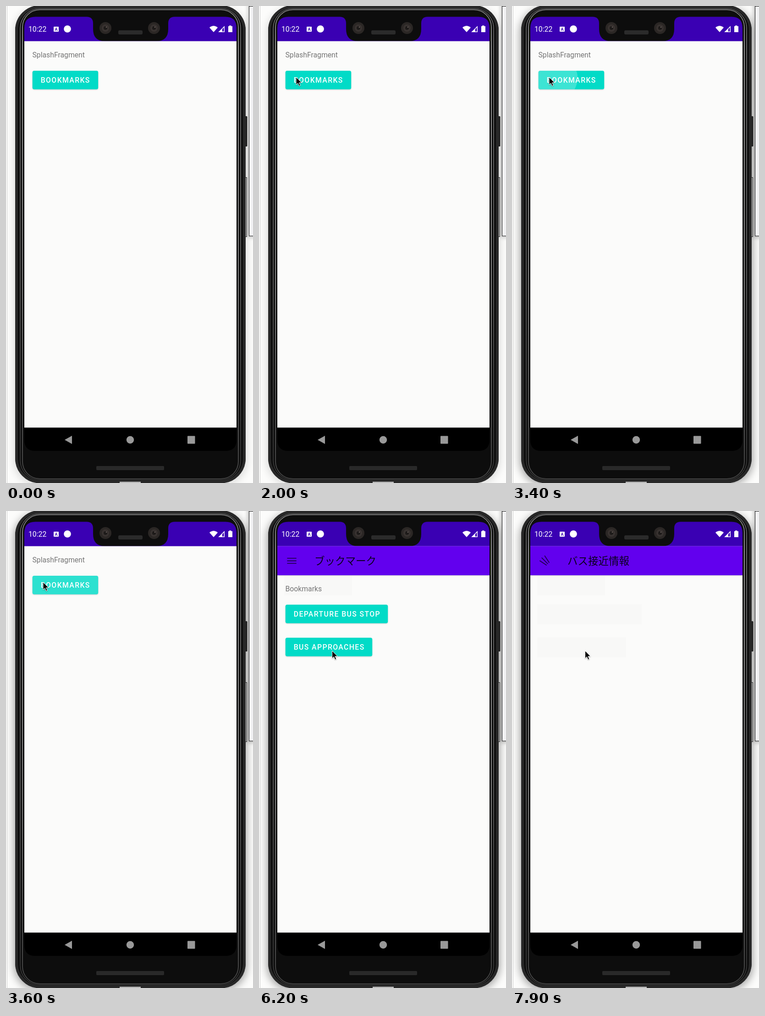
These frames come from a looping animation (539x1039 px, 8 s). An HTML page:

```html
<!DOCTYPE html>
<html lang="ja">
<head>
<meta charset="utf-8">
<title>Bookmarks</title>
<style>
html, body { margin: 0; width: 100%; height: 100%; overflow: hidden; background: #fcfcfb; }
svg { display: block; width: 100%; height: 100%; }
text { font: 15.77px Roboto, sans-serif; }
.label { fill: #757575; }
.btn { fill: #fff; font-weight: 500; letter-spacing: .0893em; }
.title { font: 22.5px "Noto Sans CJK JP", "Noto Sans CJK", sans-serif; fill: #0b0020; }
#shadow { filter: blur(9px); }
#side { filter: blur(5px); }
.plate { filter: drop-shadow(0 1px 1px rgba(0,0,0,.18)); }
</style>
</head>
<body>
<svg id="stage" viewBox="0 0 539 1039"></svg>
<script>
const K = 1.126; // pixels per dp
const TEAL = '#02dbc7';

const button = (id, y, w, label) => `
  <clipPath id="${id}Clip"><rect x="57.700" y="${y}" width="${w}" height="40.500" rx="4"/></clipPath>
  <rect class="plate" x="57.700" y="${y}" width="${w}" height="40.500" rx="4" fill="${TEAL}"/>
  <g clip-path="url(#${id}Clip)"><circle id="${id}Ripple" fill="#fff" opacity="0"/></g>
  <text class="btn" x="75.700" y="${y + 26}">${label}</text>`;

const ring = (inset, r, color, width) =>
  `<rect x="${20 + inset}" y="${inset * .5}" width="${503 - 2 * inset}" height="${1038 - inset}" rx="${r}"
    fill="none" stroke="${color}" stroke-width="${width}"/>`;

const lens = x => `
  <circle cx="${x}" cy="48" r="13" fill="#2b2725"/>
  <circle cx="${x}" cy="48" r="8" fill="#383230"/>
  <circle cx="${x}" cy="48" r="4" fill="#1d1a19"/>
  <circle cx="${x + 2}" cy="46" r="1.300" fill="#6b625d"/>`;

const ghost = (y, w, h) => `<rect x="55" y="${y}" width="${w}" height="${h}" fill="#f8f8f7"/>`;

document.getElementById('stage').innerHTML = `
<defs>
  <linearGradient id="shine" x2="0" y2="1">
    <stop offset="0" stop-color="#777"/><stop offset=".08" stop-color="#a2a2a2"/>
    <stop offset=".6" stop-color="#8c8c8c"/><stop offset="1" stop-color="#444"/>
  </linearGradient>
  <clipPath id="body"><rect x="40" y="76.600" width="463" height="842"/></clipPath>
</defs>
<rect width="539" height="1039" fill="#fcfcfb"/>
<rect id="shadow" x="17" y="4" width="509" height="1040" rx="54"/>
<rect id="side" x="528" y="-10" width="30" height="514"/>
<path d="M2.5 0V1039" stroke="#cfcfcf"/>
<rect x="530.5" y=".5" width="20" height="500.500" fill="#f1f1f3" stroke="#111"/>

<rect x="520" y="240" width="6.500" height="66" rx="1.500" fill="#222"/>
<rect x="520" y="373.500" width="5.500" height="129" fill="#b4b4b4" stroke="#222"/>
<rect x="20" y="0" width="503" height="1038" rx="54" fill="#0d0d0d"/>
${ring(3, 51, '#282828', 6)}
${ring(11, 43, 'url(#shine)', 1.2)}
${ring(16, 38, 'url(#shine)', 1.8)}
<path d="M248 1037.5H294" stroke="#eee" stroke-width="2"/>
<rect x="197" y="1002" width="148" height="9" rx="2" fill="#292929"/>

<path d="M40 77V48Q40 23.500 64 23.500H176Q190 23.500 190 38V50Q190 76.600 216 76.600H328Q354 76.600 354 50V38Q354 23.500 368 23.500H479Q503 23.500 503 48V77Z" fill="#3a00b3"/>
<rect x="40" y="76.600" width="463" height="842" fill="#fbfbfa"/>
<rect x="245" y="53" width="53" height="9" rx="3" fill="#2b2b2b"/>
${lens(217)}${lens(323)}

<text x="49" y="56" fill="#fff">10:22</text>
<rect x="104" y="45" width="11" height="11" rx="1" fill="#fff"/>
<text x="109.5" y="54" text-anchor="middle" fill="#3a00b3" style="font-size:9px;font-weight:700">A</text>
<circle cx="134" cy="50" r="7.800" fill="#fff"/>
<path d="M444 47Q453 39.500 462 47L453 57Z" fill="#fff"/>
<path d="M465 56.200L476.200 45V56.200Z" fill="none" stroke="#fff" stroke-width="1.500"/>
<path d="M464 57L472 49V57Z" fill="#fff"/>
<path d="M485 44H487V42.500H491.500V44H494V57H485Z" fill="#fff"/>

<g clip-path="url(#body)">
  <g id="splash">
    <text class="label" x="57.500" y="112">SplashFragment</text>
    ${button('first', 141, 143.5, 'BOOKMARKS')}
  </g>
  <g id="trace">${ghost(141, 148, 43)}</g>
  <g id="marks">
    <text class="label" x="57.500" y="175">Bookmarks</text>
    ${button('depart', 204, 223.5, 'DEPARTURE BUS STOP')}
    ${button('second', 276, 189.5, 'BUS APPROACHES')}
  </g>
  <g id="traces">${ghost(203, 228, 44)}${ghost(275, 194, 44)}</g>
  <g id="bar">
    <rect class="plate" x="40" y="76" width="463" height="64" fill="#6200ee"/>
    <path id="icon" fill="none" stroke="#000" stroke-opacity=".65" stroke-width="1.900"/>
    <text id="title" class="title" x="121" y="117"></text>
  </g>
</g>

<path d="M40 918.500H503V945Q503 969 479 969H64Q40 969 40 945Z" fill="#000"/>
<path d="M128 945L144 936V954Z" fill="#999"/>
<circle cx="271" cy="945" r="8.200" fill="#999"/>
<rect x="396" y="936.500" width="16.500" height="17" rx="1" fill="#999"/>
<path id="cursor" d="M0 0V16.500L3.800 13L6.500 19.300L9.300 18.100L6.600 12H11.800Z" fill="#000" stroke="#fff"
  style="filter:drop-shadow(0 1px 1px rgba(0,0,0,.35))"/>`;

const $ = id => document.getElementById(id);
const mix = (a, b, p) => a + (b - a) * p;
const part = (t, a, b) => Math.min(1, Math.max(0, (t - a) / (b - a)));
const ease = p => (1 - Math.cos(Math.PI * p)) / 2;
const fade = (id, alpha) => $(id).setAttribute('opacity', +alpha);

// time, x, y of the pointer
const path = [
  [500, 395, 128], [1300, 17, 136], [1400, 14, 136], [2000, 81, 155],
  [4500, 81, 155], [5000, 160, 313], [5700, 160, 313], [6000, 162, 311], [6200, 159.5, 304.5], [8000, 159.5, 304.5]
];

function pointer(t) {
  const i = Math.max(1, path.findIndex(k => k[0] >= t));
  const [a, b] = [path[i - 1], path[i]];
  const p = ease(part(t, a[0], b[0]));
  return [mix(a[1], b[1], p), mix(a[2], b[2], p)];
}

// A bounded press ripple: grows and drifts to the button's centre, then fades
function ripple(id, dt, x, y, top, w) {
  const p = dt < 100 ? 0 : dt < 200 ? .24 : part(dt, 0, 300);
  const alpha = dt < 0 ? 0 : dt < 100 ? .13 : mix(.23, .1, part(dt, 200, 400));
  const c = $(id);
  c.setAttribute('cx', mix(x, 58 + w / 2, p));
  c.setAttribute('cy', mix(y, top + 20, p));
  c.setAttribute('r', mix(w * .3, Math.hypot(w / 2, 20), p));
  fade(id, alpha);
}

// Menu bars (p = 0) turning into a back arrow (p = 1)
function menu(p, mirror) {
  const cut = .7 * p, turn = p * Math.PI / 4;
  const shaft = mix(18, 16, p), head = mix(18, 11.3, p);
  const off = mix(5, -.7, p), w = head * Math.cos(turn), h = head * Math.sin(turn);
  const d = [[-shaft / 2 + cut, 0, shaft - 2 * cut, 0], [-shaft / 2, off, w, h], [-shaft / 2, -off, w, -h]];
  $('icon').setAttribute('d', d.map(l => {
    const [x, y, dx, dy] = l.map(v => v * K);
    return `M${x} ${y}l${dx} ${dy}`;
  }).join(''));
  $('icon').setAttribute('transform', `translate(71.5 108.5) rotate(${mix(-180, 0, p) * (mirror ? -1 : 1)})`);
}

function draw(t) {
  const opened = t >= 3800, left = t >= 7900;
  fade('splash', !opened);
  fade('trace', opened);
  fade('traces', left);
  fade('bar', opened);
  fade('marks', left ? 0 : part(t, 3700, 4100));
  $('bar').setAttribute('transform', `translate(0 ${-64 * (1 - ease(part(t, 3700, 4000)))})`);
  $('title').textContent = left ? 'バス接近情報' : 'ブックマーク';
  if (t < 7800) menu(1 - ease(part(t, 3900, 4200)), true);
  else menu(ease(part(t, 7800, 8100)), false);

  ripple('firstRipple', t - 3300, 81, 155, 141, 143);
  ripple('secondRipple', t - 7500, 160, 304, 276, 189);

  const focus = part(t, 2700, 2900);
  fade('shadow', mix(.13, .34, focus));
  fade('side', mix(.22, .28, focus));

  const [x, y] = pointer(t);
  $('cursor').setAttribute('transform', `translate(${x} ${y})`);
  fade('cursor', t >= 500);
}

function tick(now) {
  draw(Math.floor(now % 8000 / 100) * 100);
  requestAnimationFrame(tick);
}
draw(0);
requestAnimationFrame(tick);
</script>
</body>
</html>
```
